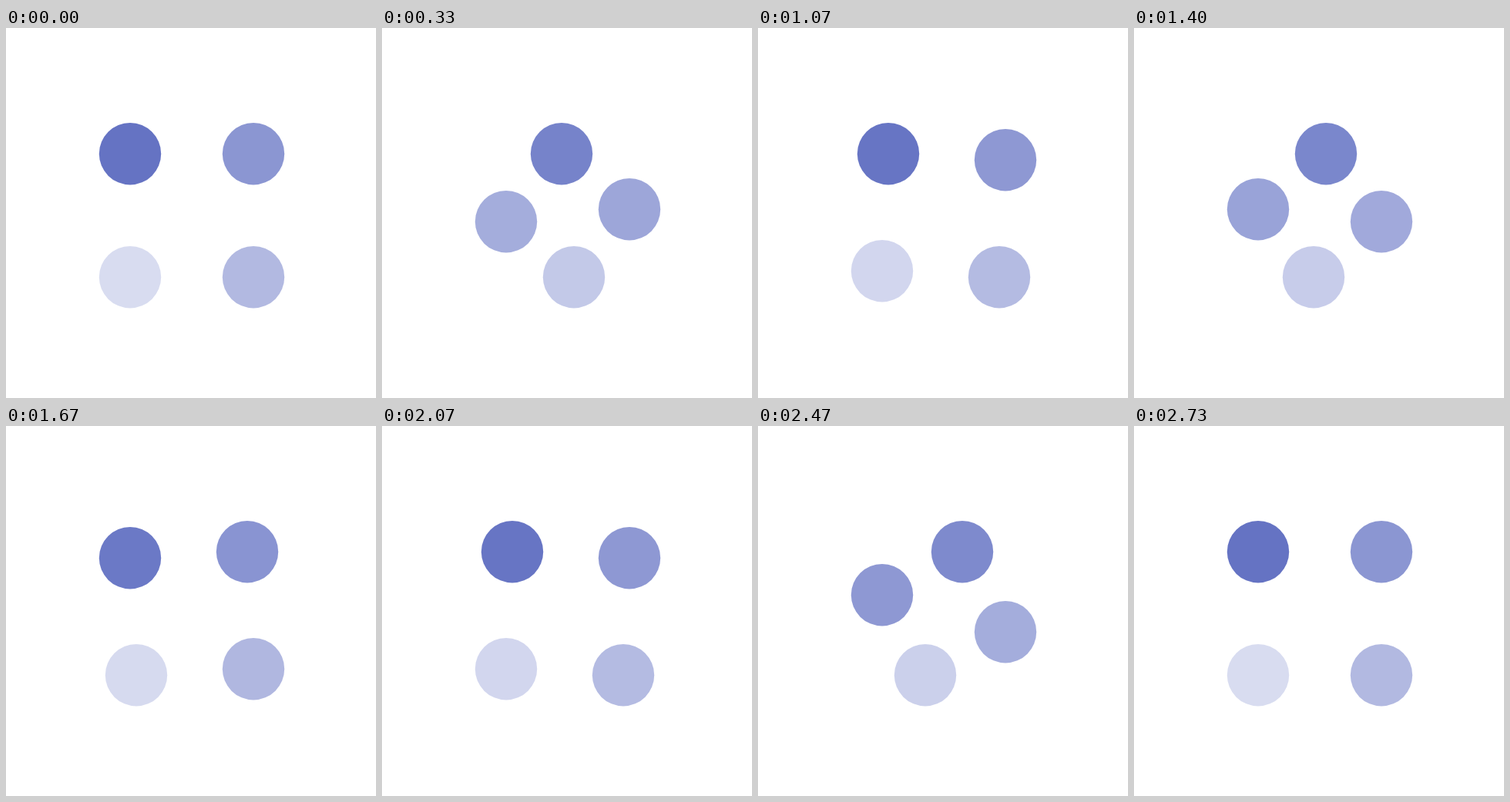
Animation of 480 by 480 pixels, one loop 3.14 s. Source, as an HTML page with a canvas:

```html
<!DOCTYPE html>
<html lang="en">
<head>
<meta charset="utf-8">
<title>Four circling dots</title>
<style>
  html, body { margin: 0; width: 100%; height: 100%; overflow: hidden; background: #fff; }
  canvas { display: block; }
</style>
</head>
<body>
<canvas id="stage" width="480" height="480"></canvas>
<script>
const ctx = document.getElementById('stage').getContext('2d');

const LOOP = 3140;
const CYCLE = 1000;
const RADIUS = 40.2;

// Corners in clockwise order; each dot takes on the opacity of the corner it reaches.
const corners = [
  { x: 161, y: 163.2, alpha: 0.8 },
  { x: 321, y: 163.2, alpha: 0.6 },
  { x: 321, y: 323.2, alpha: 0.4 },
  { x: 161, y: 323.2, alpha: 0.2 }
];

const mix = (a, b, u) => a + (b - a) * u;

// Linear travel sampled at 15 steps per second, on a 10 ms clock.
function progress(time) {
  if (time >= 3 * CYCLE) return 0;
  const ticks = Math.floor((time % CYCLE) / 10);
  const step = Math.floor((ticks + 0.5) * 0.15);
  return Math.min(1, Math.max(0, (step - 0.5) / 10));
}

function draw(time) {
  const u = progress(time);
  ctx.clearRect(0, 0, 480, 480);
  corners.forEach((from, i) => {
    const to = corners[(i + 1) % corners.length];
    ctx.fillStyle = `rgba(63, 81, 181, ${mix(from.alpha, to.alpha, u)})`;
    ctx.beginPath();
    ctx.arc(mix(from.x, to.x, u), mix(from.y, to.y, u), RADIUS, 0, Math.PI * 2);
    ctx.fill();
  });
}

const start = performance.now();

function tick() {
  draw((performance.now() - start) % LOOP);
  requestAnimationFrame(tick);
}

tick();
</script>
</body>
</html>
```
